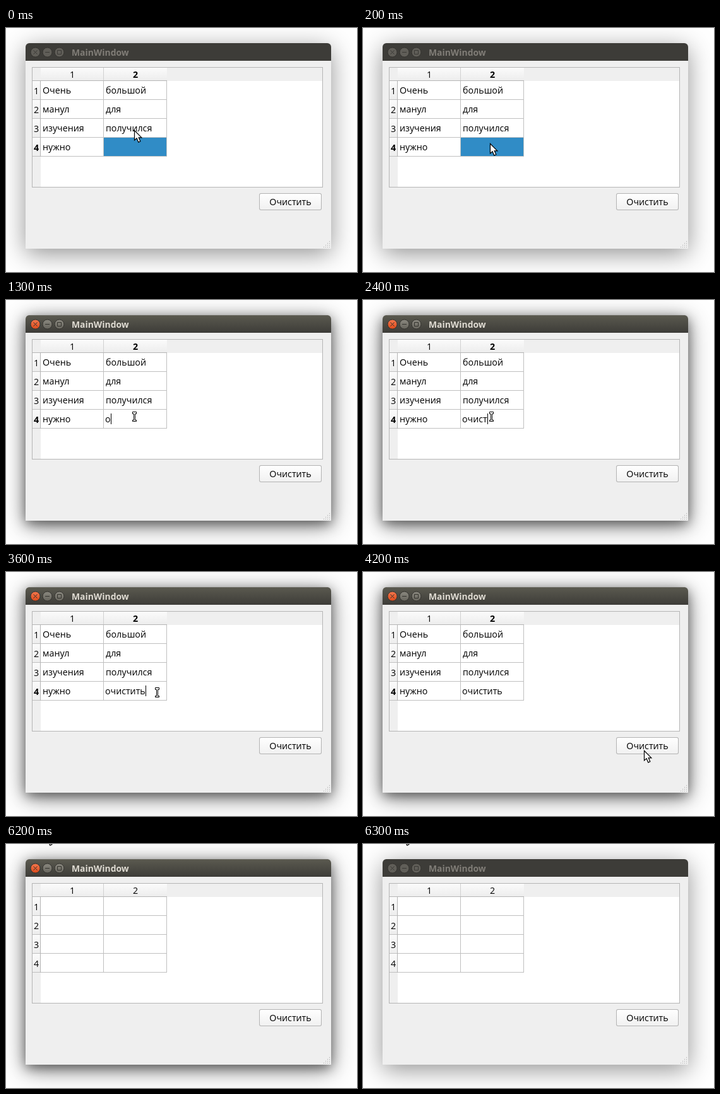
Recreate the animation shown at these times as an HTML page with a canvas. Size 556x387 px, loop 6500 ms.

```html
<!DOCTYPE html>
<html lang="ru">
<head>
<meta charset="utf-8">
<title>MainWindow</title>
<style>
  html, body { margin: 0; width: 100%; height: 100%; overflow: hidden; background: #fff; }
  canvas { display: block; }
</style>
</head>
<body>
<canvas id="stage" width="556" height="387"></canvas>
<script>
const ctx = document.getElementById('stage').getContext('2d', { alpha: false });
const LOOP = 6500;
const FONT = '"Open Sans", "Noto Sans", sans-serif';
const ROWS = [['Очень', 'большой'], ['манул', 'для'], ['изучения', 'получился'], ['нужно', '']];
const WORD = 'очистить';

// [time, value...]: each entry holds until the next one
const TYPED = [[0, 0], [1300, 1], [1800, 2], [2000, 3], [2300, 4], [2400, 5], [2700, 7], [3000, 8]];
const CARET = [[0, false], [500, true], [1000, false], [1300, true], [3700, false], [4300, true], [4900, false]];
const POINTER = [
  [0, 'arrow', 203, 162], [100, 'arrow', 202, 173], [200, 'arrow', 201, 183],
  [500, 'beam', 203, 185], [3600, 'beam', 239, 191],
  [3700, 'arrow', 289, 214], [3800, 'arrow', 348, 240], [3900, 'arrow', 397, 262],
  [4000, 'arrow', 427, 275], [4100, 'arrow', 440, 281], [4200, 'arrow', 445, 283],
  [5200, 'arrow', 420, 271], [5300, 'none', 0, 0], [6200, 'arrow', 63, -17]
];
const at = (track, t) => track.filter(e => e[0] <= t).pop().slice(1);

function box(x, y, w, h, fill) {
  ctx.fillStyle = fill;
  ctx.fillRect(x, y, w, h);
}

function fade(y0, y1, top, bottom) {
  const g = ctx.createLinearGradient(0, y0, 0, y1);
  g.addColorStop(0, top);
  g.addColorStop(1, bottom);
  return g;
}

function text(s, x, y, { color = '#000', weight = 500, size = 14.25, align = 'left' } = {}) {
  ctx.font = `${weight} ${size}px ${FONT}`;
  ctx.textAlign = align;
  ctx.fillStyle = color;
  ctx.fillText(s, x, y);
}

function shape(points, fill, stroke, width = 1) {
  ctx.beginPath();
  points.forEach(([x, y]) => ctx.lineTo(x, y));
  ctx.closePath();
  ctx.fillStyle = fill;
  ctx.fill();
  ctx.strokeStyle = stroke;
  ctx.lineWidth = width;
  ctx.stroke();
}

function rounded(x, y, w, h, radii, fill) {
  ctx.beginPath();
  ctx.roundRect(x, y, w, h, radii);
  ctx.fillStyle = fill;
  ctx.fill();
}

function shadow(dy, blur, alpha) {
  ctx.save();
  ctx.shadowColor = `rgba(0,0,0,${alpha})`;
  ctx.shadowBlur = blur;
  ctx.shadowOffsetY = dy;
  rounded(31, 24, 484, 326, [6, 6, 0, 0], '#efefef');
  ctx.restore();
}

function titleButton(x, fill, mark, icon) {
  ctx.beginPath();
  ctx.arc(x, 38.5, 7.5, 0, 7);
  ctx.fillStyle = fill;
  ctx.fill();
  ctx.strokeStyle = '#34332f';
  ctx.lineWidth = 1;
  ctx.stroke();
  ctx.strokeStyle = mark;
  ctx.stroke(new Path2D(`M${x} 38.5 ${icon}`));
}

function drawWindow(active) {
  box(0, 0, 556, 387, '#fff');
  shadow(8, 38, 0.43);
  if (active) shadow(5, 19, 0.5);
  rounded(31, 24, 484, 28, [6, 6, 0, 0], active ? fade(24, 52, '#5b5a50', '#3d3c38') : '#3d3c38');
  if (active) box(36, 24, 474, 1, '#696860');
  const gray = active ? fade(31, 46, '#8a887f', '#67655d') : '#605e58';
  const mark = active ? '#33322d' : '#3a3935';
  titleButton(46.5, active ? fade(31, 46, '#f4784e', '#dd4a1b') : gray, mark, 'm-3 -3l6 6m0 -6l-6 6');
  titleButton(65.5, gray, mark, 'm-3.5 0h7');
  titleButton(84.5, gray, mark, 'm-3 -3h6v6h-6z');
  text('MainWindow', 104, 44, { weight: 700, size: 13.9, color: active ? '#dfdbd2' : '#807d77' });

  for (let i = 0; i < 4; i++)
    for (let j = 0; j <= i; j++) box(512 - 3 * j, 338 + 3 * i, 1, 1, '#a8a8a8');

  rounded(401, 262, 99, 27, 3, '#b3b3b3');
  rounded(402, 263, 97, 25, 2, fade(263, 288, '#fefefe', '#f1f1f1'));
  text('Очистить', 450.5, 281, { align: 'center' });
}

function drawTable(full) {
  const line = '#c0c0c0';
  box(41, 62, 461, 191, '#b5b5b5');
  box(42, 63, 459, 189, '#fff');
  box(42, 63, 459, 21, '#efefef');
  box(42, 63, 13, 189, '#efefef');
  box(55, 63, 200, 20, fade(63, 83, '#fbfbfb', '#ededed'));
  box(154, 63, 1, 20, '#d0d0d0');
  for (let c = 0; c < 2; c++) {
    box(154 + 100 * c, 84, 1, 120, line);
    text(c + 1, 105 + 100 * c, 79, { weight: full && c === 1 ? 700 : 500, align: 'center' });
  }
  ROWS.forEach((cells, r) => {
    const y = 84 + 30 * r;
    box(42, y, 12, 29, fade(y, y + 29, '#fbfbfb', '#ededed'));
    box(42, y + 29, 213, 1, line);
    text(r + 1, 48, y + 21, { weight: full && r === 3 ? 700 : 500, align: 'center' });
    if (full) cells.forEach((s, c) => text(s, 58 + 100 * c, y + 20));
  });
  box(42, 83, 213, 1, '#b5b5b5');
  box(54, 84, 1, 120, '#b5b5b5');
}

function drawEntry(t) {
  if (t < 400) return box(155, 174, 99, 29, '#308cc6');
  if (t < 500) {
    box(155, 174, 99, 29, '#2a7bb0');
    return box(156, 175, 97, 27, fade(175, 202, '#3192cf', '#308cc6'));
  }
  const typed = WORD.slice(0, at(TYPED, t)[0]);
  text(typed, 157, 194);
  if (at(CARET, t)[0]) box(157 + Math.round(ctx.measureText(typed).width), 180, 1, 17, '#000');
}

function drawPointer(t) {
  const [kind, x, y] = at(POINTER, t);
  if (kind === 'none') return;
  ctx.save();
  ctx.translate(x + 0.5, y + 0.5);
  if (kind === 'arrow') {
    shape([[0, 0], [0, 15.5], [3.6, 12.3], [6.3, 18.6], [9.3, 17.3], [6.7, 11.3], [11.3, 11.3]], '#fff', '#000', 1.2);
  } else {
    shape([[-3, -8], [3, -8], [3, -5], [1, -5], [1, 5], [3, 5],
           [3, 7], [-3, 7], [-3, 5], [-1, 5], [-1, -5], [-3, -5]], '#fff', '#000');
  }
  ctx.restore();
}

function frame() {
  const t = performance.now() % LOOP;
  const full = t < 4900;
  drawWindow(t >= 400 && t < 6300);
  drawTable(full);
  if (full) drawEntry(t);
  drawPointer(t);
  requestAnimationFrame(frame);
}
frame();
</script>
</body>
</html>
```
